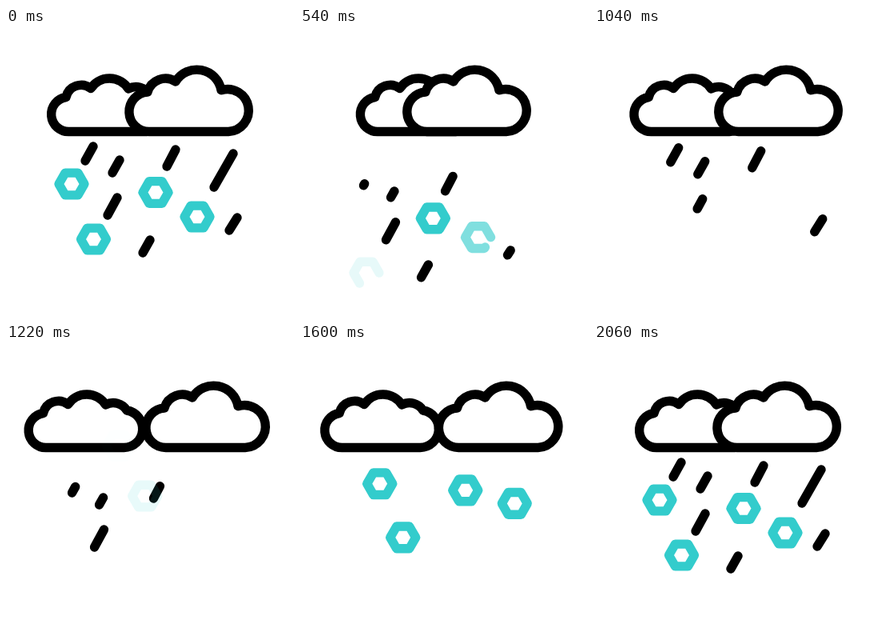
Animation of 360 by 360 pixels, one loop 2400 ms. Source, as an HTML page:

```html
<!DOCTYPE html>
<html lang="en">
<head>
<meta charset="utf-8">
<title>Sleet</title>
<style>
  html, body { margin: 0; width: 100%; height: 100%; overflow: hidden; background: #fff; }
  svg { display: block; width: 100vw; height: 100vh; }
  .ink { fill: #fff; stroke: #000; stroke-width: 11.4; stroke-linecap: round; stroke-linejoin: round; }
  .ice { fill: none; stroke: #33cccc; stroke-width: 11.4; stroke-linecap: round; stroke-linejoin: round; }
</style>
</head>
<body>
<svg viewBox="0 0 360 360">
  <g id="rain"></g>
  <path id="back" class="ink" d="M79 129.5A21.63 21.63 0 0 1 75 86.5A19.5 19.5 0 0 1 106 75.5A28 28 0 0 1 153 76A20 20 0 0 1 179.5 83A23.4 23.4 0 0 1 176 129.5Z"/>
  <g id="hail"></g>
  <path id="front" class="ink" d="M179 129.5A24.78 24.78 0 0 1 177 80A23 23 0 0 1 212 67A31 31 0 0 1 269 77.7A26.5 26.5 0 1 1 278 129.5Z"/>
</svg>
<script>
const LOOP = 2400, REST = 2060;
const $ = id => document.getElementById(id);
const clamp = v => Math.max(0, Math.min(1, v));
const part = (t, a, b) => clamp((t - a) / (b - a));
const mix = (a, b, p) => a + (b - a) * p;

// Symmetric cubic-bezier(.5, 0, .5, 1)
function ease(x) {
  let lo = 0, hi = 1;
  for (let i = 0; i < 24; i++) {
    const m = (lo + hi) / 2;
    if (1.5 * m * (1 - m) + m ** 3 < x) lo = m; else hi = m;
  }
  return lo * lo * (3 - 2 * lo);
}

function sway(t, near, far) {
  if (t < 705) return near * ease(part(t, 0, 700));
  if (t < 1372) return mix(near, far, ease(part(t, 705, 1372)));
  return far * (1 - ease(part(t, 1372, 2036)));
}

function add(parent, tag, attrs) {
  const el = document.createElementNS('http://www.w3.org/2000/svg', tag);
  for (const k in attrs) el.setAttribute(k, attrs[k]);
  return parent.appendChild(el);
}

// Top and bottom end, then spans: first erase, second grow and erase, last grow
const drops = [
  { line: [109, 148, 99, 166], out: [400, 560], mid: [860, 980, 1140, 1280], back: [1580, 1740] },
  { line: [142, 165, 133, 181], out: [460, 620], mid: [880, 1000, 1160, 1300], back: [1620, 1780] },
  { line: [139, 212, 127, 234], out: [690, 865], mid: [955, 1110, 1330, 1485], back: [1850, 2020] },
  { line: [212, 152, 201, 173], out: [520, 690], mid: [840, 980, 1180, 1330], back: [1600, 1760] },
  { line: [284, 157, 260, 199], out: [180, 346], mid: [590, 770, 840, 1010], back: [1560, 1760] },
  { line: [289, 237, 279, 253], out: [440, 600], mid: [880, 1010, 1070, 1190], back: [1640, 1790] },
  { line: [180, 265, 171, 281], out: [540, 700], back: [1620, 1790] }
];
for (const d of drops) d.el = add($('rain'), 'line', { class: 'ink' });

function drawDrop(d, t) {
  let from = 0, to = 1, dx, dy;
  if (t < d.out[1]) {
    const k = (t / 340) ** 1.55;
    dx = -9.5 * k; dy = 15 * k;
    from = part(t, ...d.out);
  } else if (t < d.back[0] && d.mid) {
    const k = (Math.min(t, 1385) - 1040) / 340;
    dx = -3.2 - 25 * k; dy = 1.6 + 34.5 * k;
    to = part(t, d.mid[0], d.mid[1]);
    from = part(t, d.mid[2], d.mid[3]);
  } else {
    const k = ((REST - t) / 240) ** 2;
    dx = 7.7 * k; dy = -11.7 * k;
    to = part(t, ...d.back);
  }
  const [x1, y1, x2, y2] = d.line, el = d.el;
  el.style.display = to > from ? '' : 'none';
  el.setAttribute('x1', mix(x1, x2, from) + dx);
  el.setAttribute('y1', mix(y1, y2, from) + dy);
  el.setAttribute('x2', mix(x1, x2, to) + dx);
  el.setAttribute('y2', mix(y1, y2, to) + dy);
}

// Rest position, leaving drift, arriving drift, fade spans
const stones = [
  { at: [82, 195], go: [-22, 35], come: [4.85, -5.55], out: [345, 460], back: [1220, 1388] },
  { at: [187, 205.5], go: [-11.3, 17.7], come: [5.4, -6.2], out: [640, 807], back: [1320, 1490] },
  { at: [239, 236], go: [-9, 14], come: [8, -10], out: [480, 640], back: [1440, 1600] },
  { at: [109.5, 264], go: [-14.5, 23], come: [5.25, -6.05], out: [400, 560], back: [1200, 1388] }
];
const hexPath = 'M' + [0, 1, 2, 3, 4, 5].map(i => {
  const a = -i * Math.PI / 3;
  return (16 * Math.cos(a)).toFixed(2) + ' ' + (16 * Math.sin(a)).toFixed(2);
}).join('L') + 'Z';
for (const s of stones) s.el = add($('hail'), 'path', { class: 'ice', d: hexPath, pathLength: 100 });

function drawStone(s, t) {
  const leaving = t < s.out[1];
  const gone = leaving ? part(t, ...s.out) : 1 - part(t, ...s.back);
  const k = leaving ? (t / 340) ** 1.3 : ((REST - t) / 240) ** 2;
  const drift = leaving ? s.go : s.come;
  s.el.setAttribute('transform', `translate(${s.at[0] + drift[0] * k} ${s.at[1] + drift[1] * k})`);
  s.el.style.opacity = 1 - gone;
  s.el.style.strokeDasharray = leaving && gone > 0 ? `${100 - 39 * gone} 100` : 'none';
}

function draw(t) {
  t = Math.min(t, REST);
  $('back').setAttribute('transform', `translate(${sway(t, 20.5, -33)} 0)`);
  $('front').setAttribute('transform', `translate(${sway(t, -22, 25)} 0)`);
  drops.forEach(d => drawDrop(d, t));
  stones.forEach(s => drawStone(s, t));
}

const start = performance.now();
function tick() {
  draw((performance.now() - start) % LOOP);
  requestAnimationFrame(tick);
}
tick();
</script>
</body>
</html>
```
